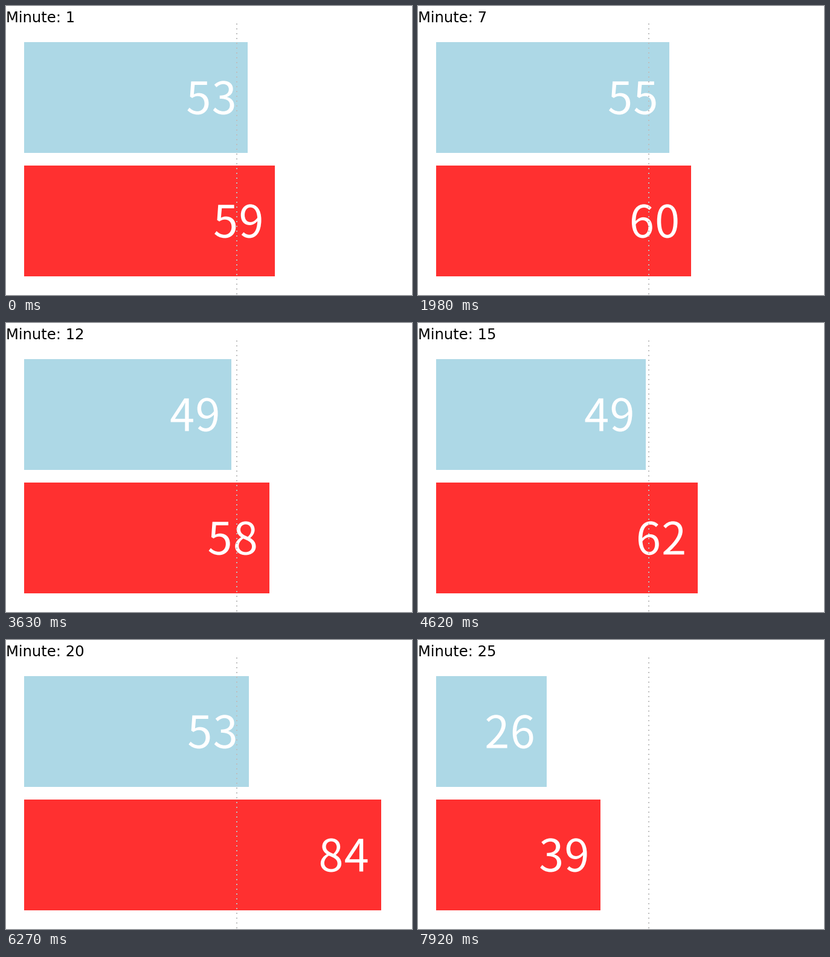
A matplotlib script that plays this animation: 672 px wide and 480 px high, repeating every 8000 ms.

```python
import numpy as np
import matplotlib.pyplot as plt
from matplotlib.animation import FuncAnimation
from matplotlib.patches import PathPatch, Rectangle
from matplotlib.path import Path
from matplotlib.textpath import TextPath
from matplotlib.transforms import Affine2D

W, H, DPI = 672, 480, 96
LOOP, TICK, MINUTE = 8000, 10, 330
LEFT, UNIT = 30, 7.04               # bar origin and pixels per point
SIZE, PITCH, GAP = 74, 42.3, 22.5   # digit size, advance, inset from bar end

# values by two-minute step; the upper bar drifts evenly between its key points
UPPER = {0: 52.6, 3: 54.8, 5: 15.45, 6: 48.7, 8: 50, 9: 17.2, 10: 52.8, 12: 26}
LOWER = [58.9, 56, 54, 59.9, 65.2, 41.6, 57.7, 61.5, 40.9, 40, 83.9, 53.3, 38.6]


def upper(step):
    return np.interp(step, list(UPPER), list(UPPER.values()))


def lower(step):
    return LOWER[step]


def glyph(char):
    if char == "1":                 # numeral one without a foot
        return Path([(20.5, 0), (26.5, 0), (26.5, 54.3), (21.3, 54.3),
                     (7, 43.2), (10.2, 38.9), (20.5, 47.2), (20.5, 0)],
                    closed=True)
    return TextPath((0, 0), char, size=SIZE,
                    prop={"family": "Noto Sans CJK JP"})


GLYPHS = {c: glyph(c) for c in "0123456789"}


def number(value, right, base):
    """Outline of a number whose ink ends at `right` on baseline `base`."""
    path = Path.make_compound_path(*(
        Affine2D().translate(i * PITCH, 0).transform_path(GLYPHS[c])
        for i, c in enumerate(str(value))))
    shift = right - path.get_extents().x1
    return Affine2D().scale(1, -1).translate(shift, base).transform_path(path)


fig = plt.figure(figsize=(W / DPI, H / DPI), dpi=DPI, facecolor="white")
ax = fig.add_axes([0, 0, 1, 1])
ax.set_xlim(0, W)
ax.set_ylim(H, 0)
ax.axis("off")


def px(size):
    return size * 72 / DPI


class Bar:
    def __init__(self, top, color, value_at):
        self.base, self.value_at = top + 119.5, value_at
        self.rect = ax.add_patch(Rectangle((LEFT, top), 0, 184, fc=color, lw=0))
        self.label = ax.add_patch(PathPatch(GLYPHS["0"], fc="white", lw=0,
                                            zorder=2))

    def show(self, step):
        value = self.value_at(step)
        width = round(value * UNIT)
        self.rect.set_width(width)
        self.label.set_path(number(round(value), LEFT + width - GAP, self.base))


bars = [Bar(60, "lightblue", upper), Bar(265, "#ff3030", lower)]
title = ax.text(0, 27, "", color="black", fontsize=px(24.3),
                family="DejaVu Sans", va="baseline")
ax.vlines(382, 29, H, colors="#bebebe", lw=px(2), zorder=3,
          linestyles=(0, (1, 3)))


def update(frame):
    minute = frame * TICK // MINUTE + 1
    title.set_text(f"Minute: {minute}")
    for bar in bars:
        bar.show(minute // 2)
    return []


anim = FuncAnimation(fig, update, frames=LOOP // TICK, interval=TICK,
                     repeat=True, repeat_delay=0, blit=False)
plt.show()
```
